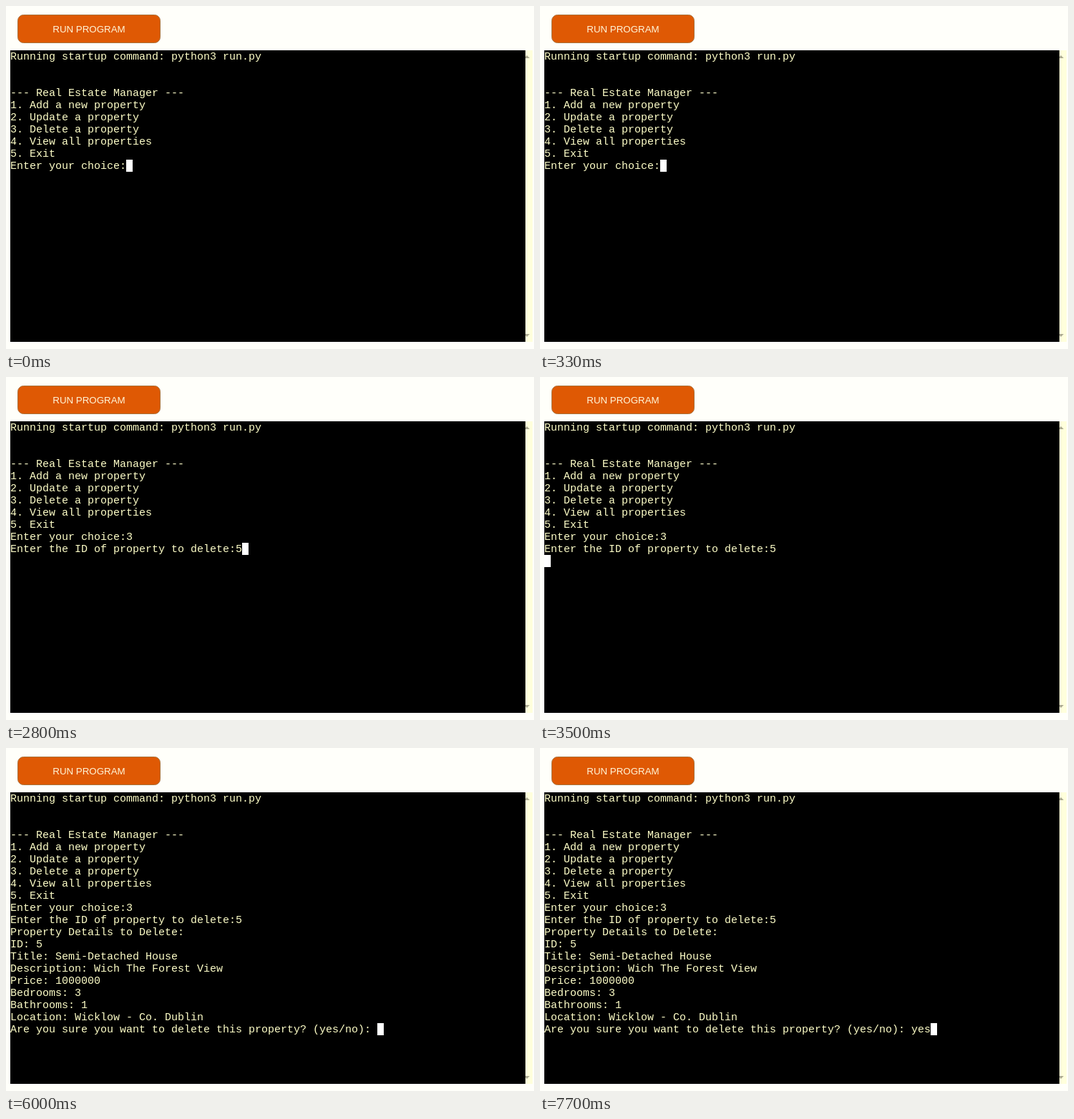
Write an HTML page with a canvas that moves like this. It is 738x480 px and loops after 8000 ms.

```html
<!DOCTYPE html>
<html lang="en">
<head>
<meta charset="utf-8">
<title>Real Estate Manager terminal</title>
<style>
  html, body { margin: 0; width: 100%; height: 100%; overflow: hidden; background: #fffffa; }
  canvas { display: block; }
</style>
</head>
<body>
<canvas id="stage" width="738" height="480"></canvas>
<script>
const ctx = document.getElementById("stage").getContext("2d");
const LOOP = 8000;
const CELL = 9, ROW = 17, LEFT = 6, TOP = 62;
const INK = "#ffffc8";

const menu = [
  "Running startup command: python3 run.py",
  "",
  "",
  "--- Real Estate Manager ---",
  "1. Add a new property",
  "2. Update a property",
  "3. Delete a property",
  "4. View all properties",
  "5. Exit",
  "Enter your choice:"
].join("\n");

const details = [
  "Property Details to Delete:",
  "ID: 5",
  "Title: Semi-Detached House",
  "Description: Wich The Forest View",
  "Price: 1000000",
  "Bedrooms: 3",
  "Bathrooms: 1",
  "Location: Wicklow - Co. Dublin",
  "Are you sure you want to delete this property? (yes/no): "
].join("\n");

// Each entry appends its text to the terminal at the given time.
const output = [
  [0, menu],
  [670, "3"],
  [1300, "\n"],
  [1330, "Enter the ID of property to delete:"],
  [2800, "5"],
  [3500, "\n"],
  [3530, details],
  [7470, "y"],
  [7600, "e"],
  [7700, "s"]
];

function rect(x, y, w, h, color) {
  ctx.fillStyle = color;
  ctx.fillRect(x, y, w, h);
}

function arrow(y, dir) {
  ctx.fillStyle = "#aaa890";
  ctx.beginPath();
  ctx.moveTo(724, y + 2 * dir);
  ctx.lineTo(732, y + 2 * dir);
  ctx.lineTo(728, y - 2 * dir);
  ctx.fill();
}

function drawButton() {
  ctx.beginPath();
  ctx.roundRect(16.5, 12.5, 199, 39, 8);
  ctx.fillStyle = "#df5904";
  ctx.fill();
  ctx.lineWidth = 1;
  ctx.strokeStyle = "#a9733c";
  ctx.stroke();
  ctx.font = "13.333px 'Liberation Sans', Arial, sans-serif";
  ctx.textAlign = "center";
  ctx.fillStyle = "#fff6d8";
  ctx.fillText("RUN PROGRAM", 116, 37);
}

function drawTerminal(time) {
  const lines = output
    .filter(([start]) => start <= time)
    .map(([, text]) => text)
    .join("")
    .split("\n");

  rect(LEFT, TOP, 720, 408, "#000");
  ctx.font = "15px 'Liberation Mono', 'Courier New', monospace";
  ctx.textAlign = "left";
  ctx.fillStyle = INK;
  lines.forEach((line, i) => ctx.fillText(line, LEFT, TOP + 13 + i * ROW));

  const last = lines.length - 1;
  rect(LEFT + lines[last].length * CELL, TOP + last * ROW, CELL, ROW, "#fff");
}

function draw(time) {
  rect(0, 0, 738, 480, "#fffffa");
  rect(720, TOP, 16, 408, "#ffffdc");
  arrow(71, 1);
  arrow(461, -1);
  drawButton();
  drawTerminal(time);
}

const begin = performance.now();
function tick() {
  draw((performance.now() - begin) % LOOP);
  requestAnimationFrame(tick);
}
tick();
</script>
</body>
</html>
```
